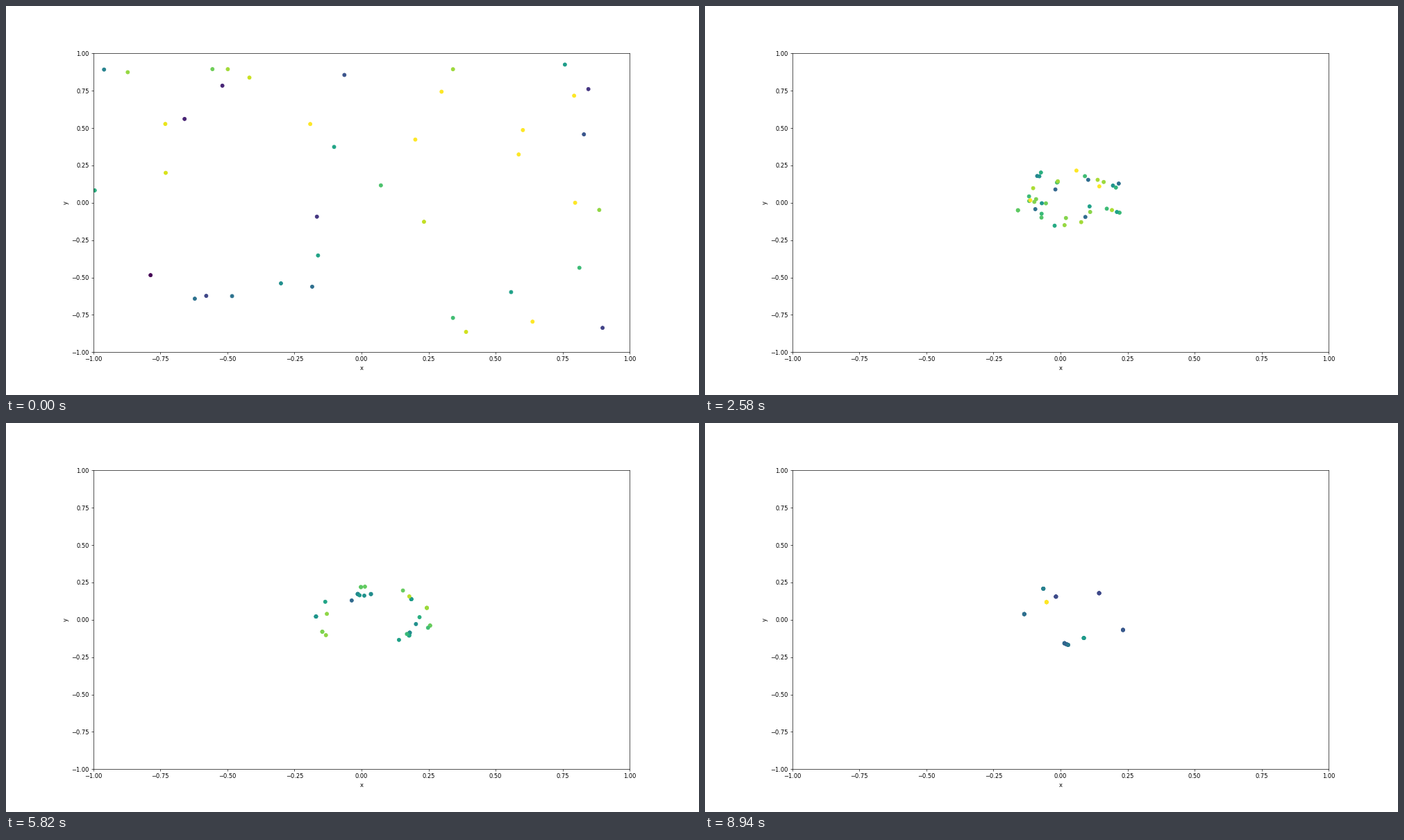
Animation, 998 px wide and 561 px high, one loop 9 s. Source, as a matplotlib script:

```python
import numpy as np
import matplotlib.pyplot as plt
from matplotlib.animation import FuncAnimation

W, H, DPI = 998, 561, 60
FRAMES, STEP_MS = 150, 60
LAST = FRAMES - 1
DOTS = 40
CENTER = np.array([0.05, 0.02])   # the swarm circles this point
LAP = 16                          # frames per lap
PACE = 0.09                       # approach distance per frame

# Where the groups come to rest: x, y, speed (0 slow, 1 fast).
GROUPS = np.array([
    (-0.065, 0.21, 0.43), (-0.017, 0.155, 0.23), (-0.052, 0.118, 1.0),
    (-0.135, 0.038, 0.36), (0.015, -0.157, 0.33), (0.022, -0.163, 0.30),
    (0.028, -0.168, 0.40), (0.087, -0.122, 0.54), (0.233, -0.068, 0.27),
    (0.144, 0.178, 0.22)])
N = len(GROUPS)

rng = np.random.default_rng(12)
start = rng.uniform(-1, 1, (DOTS, 2))
group = np.arange(DOTS) % N
rate = 2 * np.pi / LAP * rng.uniform(0.85, 1.15, N)
phase = rng.uniform(0, 2 * np.pi, N)

# Every dot strays from its group until it has merged; the first N lead.
merge_at = np.r_[np.ones(N), np.linspace(40, LAST, DOTS - N)]
stray_angle = rng.uniform(-np.pi, np.pi, DOTS)
stray_radius = -np.abs(rng.normal(0, 0.06, DOTS))
stray_speed = rng.uniform(-0.6, 0.4, DOTS)

offset = GROUPS[:, :2] - CENTER
end_angle = np.arctan2(offset[:, 1], offset[:, 0])
end_radius = np.hypot(offset[:, 0], offset[:, 1])
end_speed = GROUPS[:, 2]


def ring(frame):
    """Place and speed of each dot on its way round the center."""
    left = LAST - frame
    fade = np.clip(1 - frame / merge_at, 0, 1)

    angle = end_angle - rate * left
    radius = end_radius + 0.03 * np.sin(0.7 * rate * left)
    cruise = 0.65 + 0.2 * np.sin(0.5 * rate * left + phase)
    speed = end_speed + (cruise - end_speed) * min(1, left / LAP)

    angle = angle[group] + stray_angle * fade
    radius = np.clip(radius[group] + stray_radius * fade, 0.04, 0.22)
    speed = np.clip(speed[group] + stray_speed * fade, 0, 1)
    xy = CENTER + radius[:, None] * np.column_stack([np.cos(angle),
                                                     np.sin(angle)])
    return xy, speed


arrive = np.clip(np.hypot(*(start - ring(0)[0]).T) / PACE, 1, LAP - 1)


def swarm(frame):
    xy, speed = ring(frame)
    away = 1 - np.clip(frame / arrive, 0, 1)
    return xy + (start - xy) * away[:, None], speed


fig, ax = plt.subplots(figsize=((W + 0.01) / DPI, (H + 0.01) / DPI), dpi=DPI)
fig.subplots_adjust(left=125.6 / W, right=898.3 / W,
                    bottom=61.6 / H, top=492.8 / H)
ax.set(xlim=(-1, 1), ylim=(-1, 1), xlabel="x", ylabel="y")
xy, speed = swarm(0)
dots = ax.scatter(xy[:, 0], xy[:, 1], c=speed, cmap="viridis", vmin=0, vmax=1)


def update(frame):
    xy, speed = swarm(frame)
    dots.set_offsets(xy)
    dots.set_array(speed)
    return dots,


anim = FuncAnimation(fig, update, frames=FRAMES, interval=STEP_MS,
                     repeat=True, repeat_delay=0)
plt.show()
```
